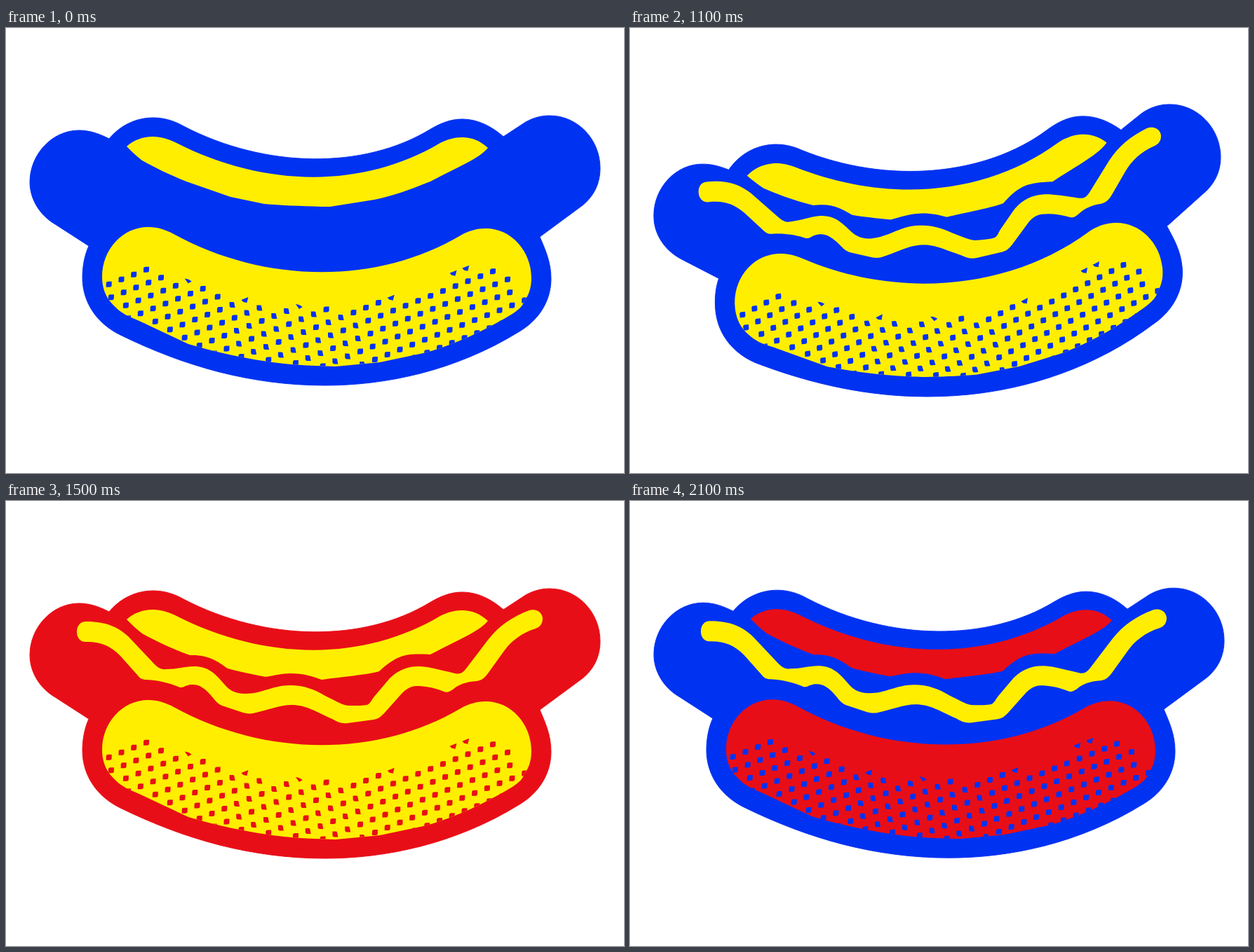
Write an HTML page with a canvas that moves like this. It is 881 by 635 pixels and loops after 3100 ms.

```html
<!DOCTYPE html>
<html lang="en">
<head>
<meta charset="utf-8">
<title>Hot dog</title>
<style>
html, body { margin: 0; width: 100%; height: 100%; overflow: hidden; background: #fff; }
canvas { display: block; width: 881px; height: 635px; }
</style>
</head>
<body>
<canvas id="stage" width="881" height="635"></canvas>
<script>
const ctx = document.getElementById('stage').getContext('2d');
const LOOP = 3100;
const BLUE = '#0032f2', RED = '#e80e17', YELLOW = '#ffee00';

const body = new Path2D(`M147 158C162 140 184 128 210 128C226 128 241 133 253 140
  C370 201 510 202 604 145C619 136 634 130 650 130C672 130 692 140 709 155L741 134
  C752 128 763 125 775 125C815 125 847 159 847 200C847 222 838 240 822 253L761 298
  C769 317 777 334 777 358C777 390 759 417 732 433C640 490 540 510 455 510
  C350 510 255 483 163 438C130 422 109 392 109 356C109 340 112 324 118 311L70 280
  C48 267 34 244 34 220C34 180 66 146 104 146C120 146 133 151 147 158Z`);

const backBun = edge => new Path2D(`M172 169C182 160 195 155 209 155C222 155 232 159 241 163
  C370 229 510 229 619 164C629 159 639 156 650 156C664 156 676 161 687 171
  C675 186 645 198 605 219${edge}C232 209 210 198 194 189C186 183 179 176 172 169Z`);
const plainBun = backBun('C575 231 550 240 525 245L462 255L450 255C420 254 390 253 368 251L320 241L257 219');
const wavyBun = backBun(`C570 217 558 219 532 243C522 247 470 252 450 255C436 250 425 246 405 246
  C395 246 382 249 370 251C350 247 330 243 316 239C303 230 290 219 262 220`);

const frontBun = new Path2D(`M137 355C137 316 166 284 203 284C216 284 228 288 239 294
  C370 366 530 366 648 296C660 289 672 286 684 286C720 286 749 318 749 357
  C749 371 745 382 738 391C736 402 712 414 690 426C650 447 610 461 590 465
  L533 477L470 483C430 482 400 480 380 477C350 473 315 466 285 458L260 451L190 418
  C178 412 165 410 149 391C140 380 137 367 137 355Z`);

const mustard = new Path2D(`M114 172C140 172 158 178 175 194L208 229C216 238 221 241 228 240
  C245 240 254 236 268 236C288 236 298 246 309 259C318 270 326 275 341 275
  C365 275 380 263 405 263C425 263 440 269 455 278C472 286 480 292 490 292
  C502 292 509 292 514 291C519 290 521 284 525 279L547 253C561 240 573 236 589 236
  C600 236 615 240 640 246C648 248 652 244 656 239L688 197C703 178 722 165 746 156
  C757 153 765 160 765 168C765 175 761 180 755 182C735 188 719 201 710 214L687 246
  C681 254 677 256 671 257C655 258 645 262 637 269C631 273 628 274 622 271
  C608 266 598 264 585 264C578 264 570 268 563 276L539 303C533 309 530 311 524 312
  L487 317C478 318 472 315 465 311C440 300 428 291 407 291C390 291 375 298 352 303
  C347 304 342 303 338 302L308 292C302 289 300 287 296 282C284 267 276 262 266 262
  C260 262 256 264 254 265C250 267 247 266 243 264C232 260 220 256 200 255
  C194 255 191 253 187 248L163 221C149 207 136 201 116 201L113 201
  C106 201 101 195 101 187C101 178 106 172 114 172Z`);

// Halftone lattice: first filled row of each column, counted from column -3.
const firstRow = [0, 0, 0, 0, 1, 2, 2, 3, 4, 5, 5, 6, 7, 7, 7, 8, 8, 9, 9, 9, 9, 9,
  10, 10, 10, 10, 9, 9, 10, 10, 11, 13];
const leaf = 'm-4-1q0-3 3-3h5v5q0 3-3 3h-5z';
const slab = 'm-4-4h5q2 0 2 3l1 5h-5q-3 0-3-3z';
const flag = 'm-5-3l5 1 5 3-5 3z';
const wedge = 'm5-4l-2 8-5-1-3-3z';
const chips = { 3: flag, 7: wedge, 11: flag, 18: wedge, 23: wedge, 24: wedge };

function halftone() {
  let d = '';
  firstRow.forEach((row, n) => {
    const i = n - 3;
    for (let j = row; j < 15; j++) {
      const x = 200 + 17.77 * i + 3.2 * j;
      const y = 344.7 - 7.02 * i + 18.5 * j;
      const shape = j === row && chips[i] || (i > 5 && i < 16 && (i + j) % 3 ? slab : leaf);
      d += `M${x.toFixed(1)} ${y.toFixed(1)}${shape}`;
    }
  });
  return new Path2D(d);
}
const dots = halftone();

// Rounded tips of the mustard while it is squeezed out.
const tips = [[200, 243], [340, 289], [480, 302], [620, 254]];

const fill = (path, color) => {
  ctx.fillStyle = color;
  ctx.fill(path);
};

function drawBody(ink) {
  fill(body, ink);
  ctx.strokeStyle = ink;
  ctx.lineWidth = 0.9;
  ctx.stroke(body);
}

function drawMustard(tip) {
  ctx.save();
  if (tip) {
    const [x, y] = tip;
    const region = new Path2D();
    region.rect(0, 0, x, 635);
    region.arc(x, y, 21, -Math.PI / 2, Math.PI / 2);
    ctx.clip(region);
  }
  fill(mustard, YELLOW);
  ctx.restore();
}

function clearStage() {
  ctx.setTransform(1, 0, 0, 1, 0, 0);
  ctx.fillStyle = '#fff';
  ctx.fillRect(0, 0, 881, 635);
}

function draw({ ink = BLUE, bun = YELLOW, step = 5, angle = 0, dx = 0, dy = 0 }) {
  clearStage();
  ctx.translate(440 + dx, 317 + dy);
  ctx.rotate(angle * Math.PI / 180);
  ctx.translate(-440, -317);
  drawBody(ink);
  fill(step < 5 ? plainBun : wavyBun, bun);
  fill(frontBun, bun);
  ctx.save();
  ctx.clip(frontBun);
  fill(dots, ink);
  ctx.restore();
  if (step) drawMustard(tips[step - 1]);
}

function stateAt(t) {
  if (t < 500) return { step: 0 };
  if (t < 900) return { step: Math.floor((t - 400) / 100) };
  if (t < 1100) return {};
  if (t < 1500) {
    return Math.floor(t / 100) % 2
      ? { angle: -5.5, dx: 7.7, dy: 15.5 }
      : { angle: 8.5, dx: -16, dy: 11.5 };
  }
  if (t < 1700) return { ink: RED };
  if (t < 1900) return {};
  if (t < 2100) return { ink: RED };
  return { bun: RED, dy: -0.8 };
}

const start = performance.now();
function tick() {
  draw(stateAt((performance.now() - start) % LOOP));
  requestAnimationFrame(tick);
}
tick();
</script>
</body>
</html>
```
